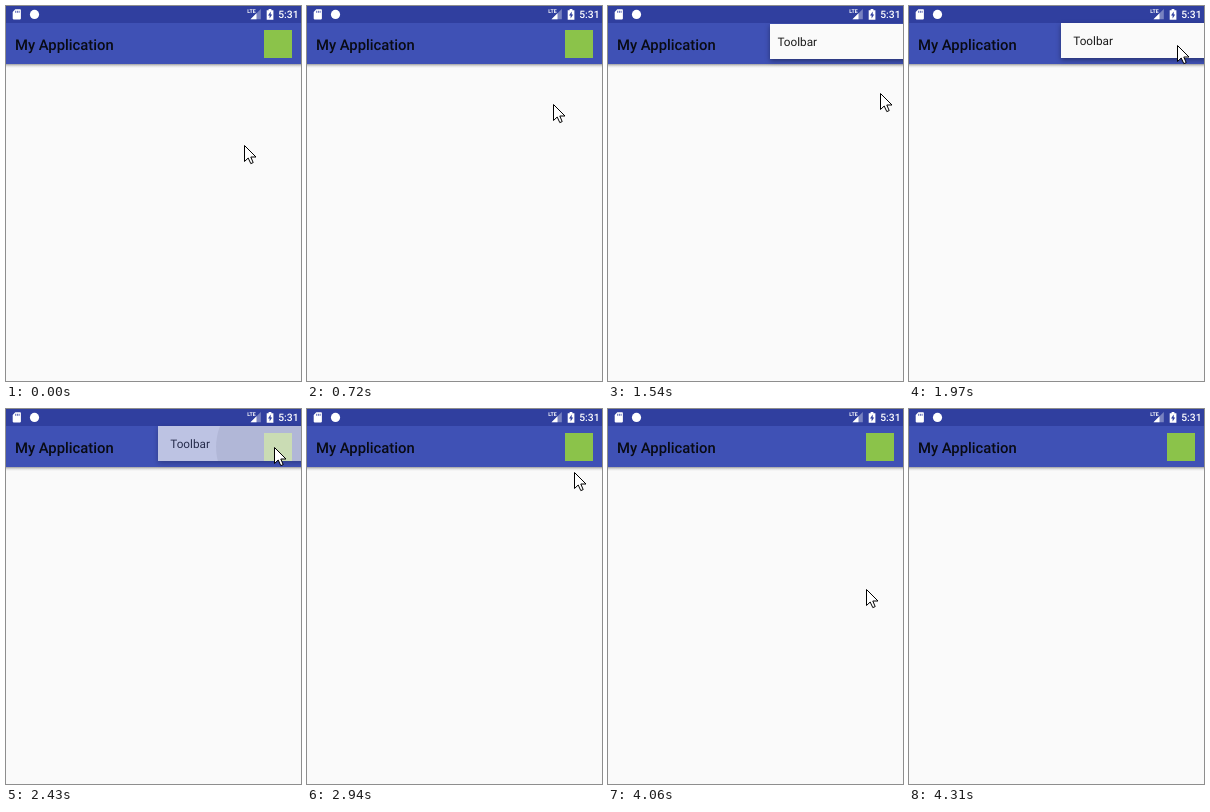
These frames come from a looping animation (295x375 px, 4.74 s). An HTML page:

```html
<!DOCTYPE html>
<html lang="en">
<head>
<meta charset="utf-8">
<title>Toolbar overflow menu</title>
<style>
  html, body { margin: 0; width: 100%; height: 100%; overflow: hidden; background: #fafafa; }
  .stage { position: relative; width: 295px; height: 375px; overflow: hidden; background: #fafafa; }
  .stage > * { position: absolute; left: 0; top: 0; }
  svg { display: block; }
  text { font-family: Roboto, Arial, sans-serif; text-rendering: geometricPrecision; }

  .popup, .label, .ripple, .cursor { animation: 4740ms step-end infinite; }

  .popup {
    width: 150px; height: 35px; overflow: hidden; background: #fafafa;
    box-shadow: 0 2px 5px rgba(0, 0, 0, .38); animation-name: popup;
  }
  .label { font-size: 11.76px; fill: #1a1a1a; animation-name: label; }
  .ripple { fill: rgba(0, 0, 0, .07); animation-name: ripple; }
  .cursor { animation-name: cursor; }

  /* The menu slides in from the top right while its left edge is revealed. */
  @keyframes popup {
    0%     { left: 221px; top: 20px; opacity: 0; }
    29.53% { left: 221px; top: 20px; opacity: 1; }
    32.48% { left: 162px; top: 18px; opacity: 1; }
    35.23% { left: 152px; top: 17px; opacity: 1; }
    51.26% { left: 152px; top: 17px; opacity: .68; }
    53.79% { left: 152px; top: 17px; opacity: 0; }
    76.16% { left: 178px; top: 19px; opacity: 1; }
    79.32% { left: 152px; top: 17px; opacity: 1; }
    82.48% { left: 152px; top: 17px; opacity: .6; }
    85.65%, 100% { left: 152px; top: 17px; opacity: 0; }
  }
  @keyframes label {
    0%     { transform: translateX(-23px); }
    32.48% { transform: translateX(7.4px); }
    35.23% { transform: translateX(12.2px); }
    76.16% { transform: translateX(-.6px); }
    79.32%, 100% { transform: translateX(12.2px); }
  }
  @keyframes ripple {
    0%     { opacity: 0; }
    51.26% { opacity: 1; }
    53.79%, 100% { opacity: 0; }
  }
  @keyframes cursor {
    0%     { left: 238px; top: 139px; opacity: 1; }
    15.18% { left: 246px; top: 98px; }
    17.72% { left: 256px; top: 59px; }
    20.88% { left: 268px; top: 47px; }
    23.41% { left: 274px; top: 42px; }
    32.48% { left: 272px; top: 87px; }
    35.23% { left: 271px; top: 93px; }
    38.39% { left: 270px; top: 50px; }
    41.56% { left: 268px; top: 39px; }
    44.93% { left: 268px; top: 38px; }
    58.86% { left: 267px; top: 50px; }
    62.02% { left: 267px; top: 63px; }
    64.55% { left: 268px; top: 96px; }
    67.08% { left: 268px; top: 47px; }
    70.25% { left: 268px; top: 31px; }
    76.16% { left: 268px; top: 112px; }
    79.32% { left: 268px; top: 119px; }
    82.48% { left: 266px; top: 114px; }
    85.65% { left: 258px; top: 180px; }
    88.39% { left: 246px; top: 283px; opacity: 1; }
    90.92%, 100% { left: 246px; top: 283px; opacity: 0; }
  }
</style>
</head>
<body>
<div class="stage">
  <svg width="295" height="375" viewBox="0 0 295 375">
    <defs>
      <linearGradient id="drop" x2="0" y2="1">
        <stop stop-color="#000" stop-opacity=".36"/>
        <stop offset=".5" stop-color="#000" stop-opacity=".1"/>
        <stop offset="1" stop-color="#000" stop-opacity="0"/>
      </linearGradient>
    </defs>
    <rect width="295" height="17" fill="#303f9f"/>
    <rect y="17" width="295" height="41" fill="#3f51b5"/>
    <rect y="58" width="295" height="4" fill="url(#drop)"/>

    <!-- status icons -->
    <g fill="#fff">
      <path d="M9.3 3.3H14.1Q14.9 3.3 14.9 4.1V12.6Q14.9 13.4 14.1 13.4H7.5Q6.7 13.4 6.7 12.6V5.9Z"/>
      <path d="M9.7 4.8V6.8M11.4 4.8V6.8M13.1 4.8V6.8" stroke="#303f9f" stroke-width=".8"/>
      <circle cx="28.5" cy="8.4" r="4.6"/>
      <path d="M244.5 13.3H254.8V3Z" opacity=".35"/>
      <path d="M244.5 13.3H250.5V7.3Z"/>
      <text x="241.2" y="7.4" font-size="5.2" font-weight="700" textLength="">LTE</text>
      <path d="M262.6 3H265.4V4.2H267.4V13.8H260.7V4.2H262.6Z"/>
      <path d="M264.7 5.6L262 9.6H263.6V12.4L266.2 8.4H264.7Z" fill="#303f9f"/>
      <text x="292.5" y="12.4" font-size="10.3" font-weight="500" text-anchor="end">5:31</text>
    </g>

    <text x="9" y="43.5" font-size="14.8" font-weight="500" fill="#090b14">My Application</text>
    <rect x="258" y="24" width="28" height="28" fill="#8bc34a"/>
  </svg>

  <div class="popup">
    <svg width="150" height="35" viewBox="0 0 150 35">
      <circle class="ripple" cx="116" cy="21" r="58"/>
      <text class="label" y="22.2">Toolbar</text>
    </svg>
  </div>

  <svg class="cursor" width="13" height="20" viewBox="0 0 13 20">
    <path d="M.5 .5V16.5L4.2 13 6.8 18.6 9.2 17.6 6.8 12H12Z" fill="#fff" stroke="#000" stroke-linejoin="round"/>
  </svg>
</div>
</body>
</html>
```
